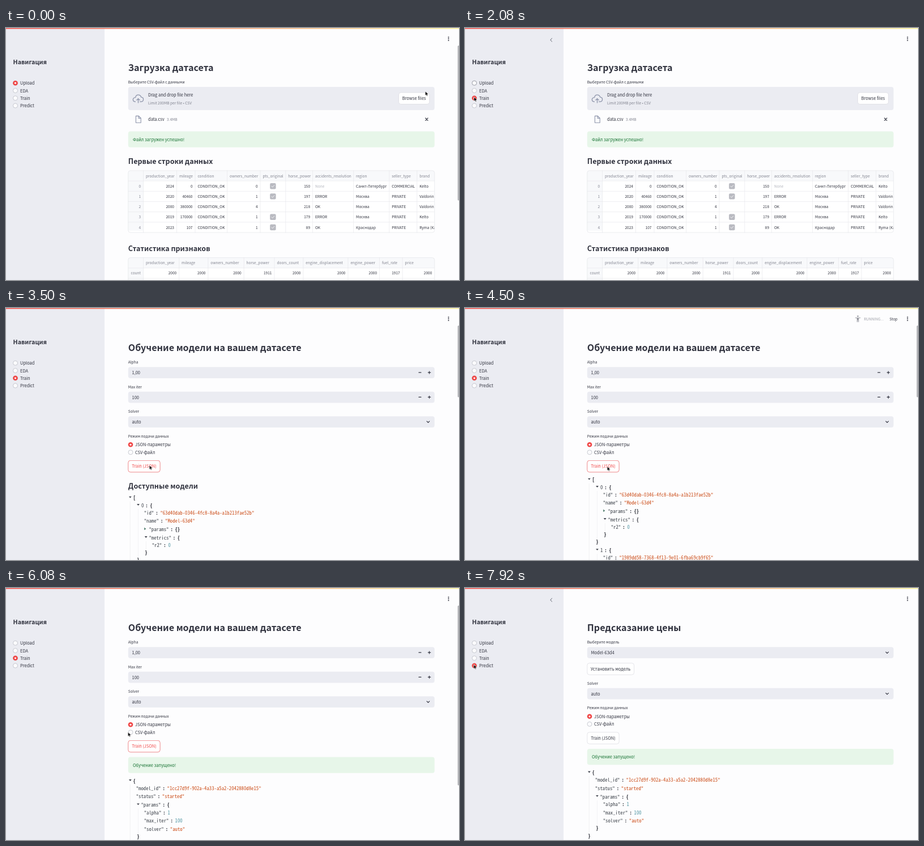
Animation of 800x445 px, one loop 8 s. Source, as an HTML page:

```html
<!DOCTYPE html>
<html lang="ru">
<head>
<meta charset="utf-8">
<title>Обучение модели</title>
<style>
html, body { margin: 0; width: 100%; height: 100%; overflow: hidden; background: #fdfdfe; }
svg { display: block; width: 100%; height: 100%; }
.scene, .alert, .cursor { animation: 8s infinite; }
.scene { animation-timing-function: step-end; }
.alert { animation-name: alert; animation-timing-function: linear; }
.cursor { animation-name: cursor; animation-timing-function: ease-in-out; }
@keyframes alert {
  0%, 69% { opacity: 0; }
  70% { opacity: .1; }
  73%, 100% { opacity: 1; }
}
@keyframes cursor {
  0%, 1% { transform: translate(740.5px, 112px); }
  10% { transform: translate(18px, 120px); }
  14%, 32% { transform: translate(16px, 122px); }
  41.5%, 45% { transform: translate(253.3px, 278px); }
  52%, 73.5% { transform: translate(251.3px, 280px); }
  81% { transform: translate(98px, 172px); }
  87%, 90% { transform: translate(18.7px, 137px); }
  93%, 100% { transform: translate(15.5px, 135.3px); }
}
</style>
</head>
<body>
<svg id="stage" viewBox="0 0 800 445"></svg>
<script>
const INK = '#31333f', MUTED = '#80838f', PANEL = '#ebecf2', LINE = '#e4e5ea',
      RED = '#f04646', GREEN = '#177233', STRING = '#cb4b16', NUMBER = '#4c93a0';
const BODY = 8.33, SMALL = 7.29, TITLE = 18.74, SUBTITLE = 14.58;

// Pick a family with proportional Cyrillic, then even out its size.
const ctx = document.createElement('canvas').getContext('2d');
const measure = (font, sample) => { ctx.font = font; return ctx.measureText(sample).width / 100; };
const CJK = "'Noto Sans CJK JP','Noto Sans CJK SC','Noto Sans CJK','Noto Sans',sans-serif";
const SANS = measure(`100px ${CJK}`, 'Москва') > 5 ? "'Noto Sans',sans-serif" : CJK;
const MONO = "'Noto Sans Mono CJK JP','Noto Sans Mono CJK SC','Noto Sans Mono',monospace";
const scale = {
  regular: 6.6 / measure(`100px ${SANS}`, 'CONDITION_OK'),
  bold: 16.33 / measure(`600 100px ${SANS}`, 'Обучение модели на вашем датасете'),
  mono: 6 / measure(`100px ${MONO}`, '0000000000')
};

const text = (x, y, str, size = BODY, fill = INK, anchor = 'start') =>
  `<text x="${x}" y="${y}" font-family="${SANS}" font-size="${size * scale.regular}" fill="${fill}" text-anchor="${anchor}">${str}</text>`;
const heading = (y, str, size = TITLE, x = 215.8) =>
  `<text x="${x}" y="${y}" font-family="${SANS}" font-weight="600" font-size="${size * scale.bold}" fill="${INK}">${str}</text>`;
const label = (y, str) => text(215.8, y, str, SMALL);
const rect = (x, y, w, h, fill, rx = 4, stroke = 'none') =>
  `<rect x="${x}" y="${y}" width="${w}" height="${h}" rx="${rx}" fill="${fill}" stroke="${stroke}" stroke-width=".6"/>`;
const path = (d, stroke = INK, width = 1, fill = 'none') =>
  `<path d="${d}" stroke="${stroke}" stroke-width="${width}" fill="${fill}" stroke-linecap="round" stroke-linejoin="round"/>`;
const circle = (x, y, r, fill, stroke = 'none') =>
  `<circle cx="${x}" cy="${y}" r="${r}" fill="${fill}" stroke="${stroke}" stroke-width=".7"/>`;
const move = (y, content) => `<g transform="translate(0 ${y})">${content}</g>`;

// Content visible between two percentages of the loop.
let rules = '', sceneCount = 0;
const show = (from, to, content) => {
  const name = `scene${sceneCount++}`;
  rules += `@keyframes ${name}{0%{opacity:0}${from}%{opacity:1}${to}%{opacity:0}}#${name}{animation-name:${name}}`;
  return `<g class="scene" id="${name}">${content}</g>`;
};

const ring = (x, y, stroke = '#b4b6bf') => circle(x, y, 4, '#fbfbfd', stroke);
const dot = (x, y) => circle(x, y, 4.3, RED) + circle(x, y, 1.6, '#fff');
const button = (x, y, w, str, color = INK, border = '#d3d4da') =>
  rect(x, y, w, 20.5, '#fff', 4, border) + text(x + w / 2, y + 13, str, BODY, color, 'middle');
const field = (y, value) => rect(215.8, y, 541, 19.7, PANEL) + text(222.5, y + 12.8, value);
const select = (y, value) => field(y, value) + path(`M743.2 ${y + 8.8}l2.3 2.3 2.3-2.3`, INK, 1.1);
const stepper = (y, value) => field(y, value) +
  path(`M729 ${y + 9.7}h4M745.4 ${y + 9.7}h4.4M747.6 ${y + 7.5}v4.4`, INK, 1.1);
const success = (y, str) => rect(215.8, y, 541, 28.3, '#e7f6e9') + text(224, y + 17.1, str, BODY, GREEN);

// Data tables
const ROW = 18.2;
const cell = (value, left, right, y, numeric) => {
  if (value === true) return rect((left + right) / 2 - 5.2, y - 7.7, 10.4, 10.4, '#b9bac1', 2) +
    path(`M${(left + right) / 2 - 2.4} ${y - 2.4}l1.7 1.8 3.2-3.6`, '#f4f4f6', 1);
  return numeric ? text(right - 4.5, y, value, SMALL, INK, 'end')
                 : text(left + 4.4, y, value, SMALL, value === 'None' ? '#b3b5be' : INK);
};
const table = (top, edges, heads, rows, numeric) => {
  const height = ROW * (rows.length + 1);
  let out = rect(215.8, top, 541, height, '#fff') +
    `<path d="M215.8 ${top + ROW}V${top + 4}q0-4 4-4H752.8q4 0 4 4V${top + ROW}z" fill="#f8f9fb"/>` +
    rect(216, top + ROW, 26.5, height - ROW - 3, '#f8f9fb', 0);
  heads.forEach((head, i) => {
    out += text(edges[i] + 4.4, top + 11.6, head, SMALL, MUTED);
    out += path(`M${edges[i]} ${top}v${height}`, LINE, .6);
  });
  rows.forEach(([index, ...values], r) => {
    const y = top + ROW * (r + 1);
    out += path(`M215.8 ${y}H756.8`, LINE, .6) + text(238, y + 11.6, index, SMALL, MUTED, 'end');
    values.forEach((v, i) => out += cell(v, edges[i], edges[i + 1], y + 11.6, numeric.includes(i)));
  });
  return `<g clip-path="url(#page)">${out}</g>` + rect(215.8, top, 541, height, 'none', 4, '#dedfe5');
};

// JSON trees
const CHAR = 4.37;
const code = (x, y, str, fill = '#3b4048', weight = 400) =>
  `<text x="${x}" y="${y + 2.4}" font-family="${MONO}" font-weight="${weight}" font-size="${CHAR / .6 * scale.mono}" fill="${fill}">${str}</text>`;
const brace = (x, y, str) => code(x, y, str, '#23252e', 700);
const pair = (x, y, key, value, fill) => {
  const end = x + key.length * CHAR;
  return code(x, y, key) + brace(end + 3, y, ':') +
    (fill ? code(end + 11.2, y, value, fill) : brace(end + 11, y, value));
};
const entry = (x, y, key, value, fill) => pair(x, y, `"${key}"`, value, fill);
const opened = (x, y) => path(`M${x - 2.4} ${y - 3.2}h4.8l-2.4 2.8z`, 'none', 0, '#3f424c');
const closed = (x, y) => path(`M${x - 1.2} ${y - 4}l2.8 2.4-2.8 2.4z`, 'none', 0, '#3c6e5c');
const guide = (x, y, h) => path(`M${x} ${y}v${h}`, '#e9e9ed', .6);

const model = (y, index, id) =>
  opened(233.5, y) + pair(239, y, index, '{') + guide(233.4, y + 6, 90) +
  entry(243.7, y + 13, 'id', `"${id}"`, STRING) +
  entry(243.7, y + 27.7, 'name', `"Model-${id.slice(0, 4)}"`, STRING) +
  closed(245.5, y + 42.2) + entry(252.5, y + 42.2, 'params', '{}') +
  opened(247.2, y + 57) + entry(252.5, y + 57, 'metrics', '{') + guide(247.3, y + 63, 14) +
  entry(257.7, y + 70.1, 'r2', '0', NUMBER) +
  brace(245.2, y + 83.7, '}') + brace(231.3, y + 96.2, '}');
const modelList = y => opened(219.4, y) + brace(224.5, y, '[') + guide(219.2, y + 6, 150) +
  model(y + 13.3, '0', '63d40dab-0346-4fc8-8a4a-a1b213fae52b') +
  model(y + 124.4, '1', '1989dd58-7368-4f13-9e01-6fba69cb9f65');
const result = opened(219.4, 341.3) + brace(224.5, 341.3, '{') + guide(219.2, 347, 98) +
  entry(229.7, 354.5, 'model_id', '"1cc27d9f-902a-4a33-a5a2-2042880d8e15"', STRING) +
  entry(229.7, 369, 'status', '"started"', STRING) +
  opened(233.4, 383.7) + entry(238.5, 383.7, 'params', '{') + guide(233.4, 390, 43) +
  entry(243.7, 397.3, 'alpha', '1', NUMBER) +
  entry(243.7, 411.8, 'max_iter', '100', NUMBER) +
  entry(243.7, 426.4, 'solver', '"auto"', STRING) +
  brace(231.3, 439.3, '}') + brace(217.3, 452.6, '}');

// Pages
const cloud = path('M228.5 130.2c-5.5-.2-5.6-7 .1-7.6 1-5.8 8.5-6 10.2-.4 5.2.3 4.9 7.8-.3 8h-2M233.5 132v-7.2m-2.6 2.4l2.6-2.6 2.6 2.6', '#8d94aa', 1.3);
const sheet = path('M229.4 155.4h5l3.8 3.8v8h-8.8zM234.2 155.6v3.8h3.8', '#8d94aa', 1.1);
const uploadPage = heading(76.2, 'Загрузка датасета') +
  label(98, 'Выберите CSV-файл с данными') +
  rect(215.8, 104, 541, 41, PANEL) + cloud +
  text(251, 121.4, 'Drag and drop file here') +
  text(251, 134.6, 'Limit 200MB per file • CSV', SMALL, MUTED) +
  button(693.5, 114, 54.3, 'Browse files') +
  sheet + text(251, 163.6, 'data.csv') + text(284, 163.6, '3.4MB', SMALL, MUTED) +
  path('M740.7 159l4.4 4.4m0-4.4l-4.4 4.4', INK, 1.1) +
  success(182.4, 'Файл загружен успешно!') +
  heading(239.6, 'Первые строки данных', SUBTITLE) +
  table(251.9, [242.5, 301.5, 334, 390.6, 449, 493.8, 541.6, 613.7, 676.8, 725.8, 790],
    ['production_year', 'mileage', 'condition', 'owners_number', 'pts_original', 'horse_power',
     'accidents_resolution', 'region', 'seller_type', 'brand'],
    [[0, 2024, 0, 'CONDITION_OK', 0, true, 150, 'None', 'Санкт-Петербург', 'COMMERCIAL', 'Kelto'],
     [1, 2020, 40460, 'CONDITION_OK', 1, true, 197, 'ERROR', 'Москва', 'PRIVATE', 'Valdorin'],
     [2, 2000, 380000, 'CONDITION_OK', 4, '', 218, 'OK', 'Москва', 'PRIVATE', 'Valdorin'],
     [3, 2019, 170000, 'CONDITION_OK', 1, true, 179, 'ERROR', 'Москва', 'PRIVATE', 'Kelto'],
     [4, 2023, 107, 'CONDITION_OK', 1, true, 89, 'OK', 'Краснодар', 'PRIVATE', 'Ryma (КЛЗ)']],
    [0, 1, 3, 5]) +
  heading(393.6, 'Статистика признаков', SUBTITLE) +
  table(405.6, [242.5, 305.7, 356.9, 420.2, 474, 524.9, 604, 659.6, 700.2, 756.8],
    ['production_year', 'mileage', 'owners_number', 'horse_power', 'doors_count',
     'engine_displacement', 'engine_power', 'fuel_rate', 'price'],
    [['count', 2000, 2000, 2000, 1911, 2000, 2000, 2000, 1917, 2000],
     ['mean', '', '', '', '', '', '', '', '', '']],
    [0, 1, 2, 3, 4, 5, 6, 7, 8]);

const trainForm = label(185.2, 'Solver') + select(191.2, 'auto') +
  label(228.7, 'Режим подачи данных') +
  dot(220, 241.3) + text(228, 244.3, 'JSON-параметры') +
  ring(220, 254.8) + text(228, 257.8, 'CSV-файл') +
  button(215.8, 269.3, 56.3, 'Train (JSON)');
const started = success(298.4, 'Обучение запущено!');
const trainPage = heading(76.2, 'Обучение модели на вашем датасете') +
  label(98, 'Alpha') + stepper(104.2, '1,00') +
  label(141.5, 'Max iter') + stepper(147.7, '100') + trainForm;
const predictPage = heading(76.2, 'Предсказание цены') +
  label(98, 'Выберите модель') + select(104.2, 'Model-63d4') +
  button(215.8, 132.7, 82.8, 'Установить модель') +
  move(-14.5, trainForm + started + result);

const navY = i => 97.2 + i * 13.3;
const sidebar = rect(0, 0, 174, 445, PANEL, 0) + heading(64.4, 'Навигация', 12.5, 12.5) +
  ['Upload', 'EDA', 'Train', 'Predict'].map((name, i) =>
    ring(16.5, navY(i)) + text(25, navY(i) + 3, name)).join('') +
  show(25.5, 28.1, ring(16.5, navY(0), '#7d808c')) +
  show(0, 25.5, dot(16.5, navY(0))) +
  show(25.5, 95, dot(16.5, navY(2))) +
  show(95, 100, dot(16.5, navY(3)));
const chevron = path('M153.6 18.2l-2.9 2.9 2.9 2.9', '#5d606c', 1);

const running = circle(693.8, 14.6, 1.3, '#9698a0') +
  path('M689.6 17.2l4.2.6 4.2-.6M692.7 18v6.4M694.9 18v6.4M692.7 21h2.2', '#9698a0', 1.1) +
  path('M692.8 17.8h2v3h-2z', '#9698a0', .6, '#9698a0') +
  text(704.4, 21.8, 'RUNNING...', SMALL, '#a0a2aa') + text(749.8, 21.8, 'Stop', SMALL);
const scrollbar = bottom => rect(797.6, 31, 3.5, bottom - 31, '#b4b5b9', 1.5);

document.getElementById('stage').innerHTML =
  `<defs>
    <clipPath id="page"><rect x="215.8" width="541" height="445"/></clipPath>
    <linearGradient id="rainbow"><stop stop-color="#f45a55"/><stop offset="1" stop-color="#fbf3a0"/></linearGradient>
  </defs>` +
  rect(0, 0, 800, 445, '#fdfdfe', 0) + sidebar +
  show(9, 35, chevron) + show(80, 100, chevron) +
  show(0, 28.1, uploadPage) +
  show(28.1, 96.5, trainPage) +
  show(40.5, 96.5, button(215.8, 269.3, 56.3, 'Train (JSON)', RED, RED)) +
  show(28.1, 54.1, heading(318.5, 'Доступные модели', SUBTITLE) + modelList(336)) +
  show(54.1, 68.75, modelList(304)) +
  show(68.75, 96.5, `<g class="alert">${started}</g>` + result) +
  show(96.5, 100, predictPage) +
  show(55, 74, running) +
  show(0, 7, scrollbar(304.5)) + show(33.3, 68.75, scrollbar(157.5)) + show(68.75, 78, scrollbar(348.5)) +
  [16.3, 19.1, 21.9].map(y => circle(781.5, y, 1, INK)).join('') +
  rect(0, 0, 800, 1.6, 'url(#rainbow)', 0) +
  `<g class="cursor">${path('M0 0v7.2l1.7-1.5 1.1 2.6 1.3-.6-1.1-2.4h2.3z', '#fff', .5, '#000')}</g>`;
document.head.append(Object.assign(document.createElement('style'), { textContent: rules }));
</script>
</body>
</html>
```
